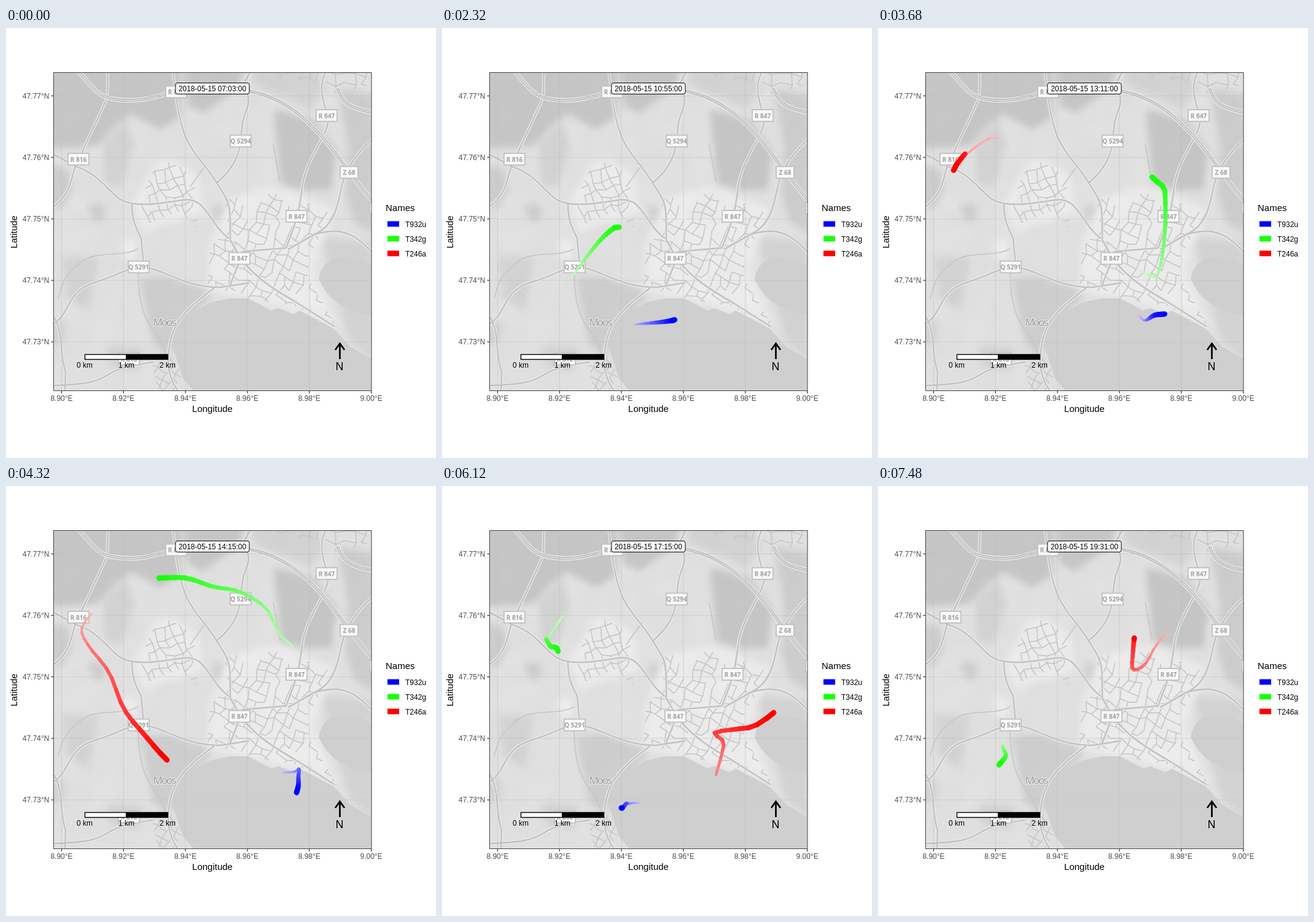
An HTML page that plays this animation: 700x700 px, repeating every 7520 ms.

```html
<!DOCTYPE html>
<html lang="en">
<head>
<meta charset="utf-8">
<title>Movement tracks</title>
<style>
html, body { margin: 0; width: 100%; height: 100%; overflow: hidden; background: #fff; }
svg { display: block; width: 700px; height: 700px; font: 12px "Liberation Sans", Arial, sans-serif; }
.mid { text-anchor: middle; }
.end { text-anchor: end; }
.tick text { fill: #4d4d4d; }
.tick line { stroke: #333; stroke-width: 1.2; }
.title { font-size: 15px; }
.line { fill: none; stroke-linecap: round; stroke-linejoin: round; }
.sign rect { fill: #f8f8f8; stroke: #c0c0c0; stroke-width: 1.8; }
.sign text { font: bold 10px "Open Sans", "Liberation Sans", sans-serif; fill: #a0a0a0; text-anchor: middle; }
.place { font: 17px "Open Sans", "Liberation Sans", sans-serif; letter-spacing: -2px; fill: #989898; stroke: #eee; stroke-width: 2; paint-order: stroke; }
</style>
</head>
<body>
<svg viewBox="0 0 700 700">
  <defs>
    <clipPath id="panel"><rect x="77.5" y="72.5" width="517.5" height="518"/></clipPath>
    <clipPath id="village"><path d="M214 289L244 224L268 218L306 240L312 326L283 298L222 322Z"/></clipPath>
    <clipPath id="town"><path d="M328 420L332 358L362 325L357 284L372 270L396 302L434 262L458 290L494 286L532 304L492 372V408L540 488L468 452L410 444Z"/></clipPath>
    <clipPath id="hamlet"><path d="M235 535L262 525L285 560L288 591H248Z"/></clipPath>
    <clipPath id="north"><path d="M440 73H595V92L540 108L500 86H448Z"/></clipPath>
    <filter id="soft" x="-20%" y="-20%" width="140%" height="140%"><feGaussianBlur stdDeviation="6"/></filter>
    <filter id="relief" x="0" y="0" width="100%" height="100%">
      <feTurbulence type="fractalNoise" baseFrequency=".022" numOctaves="3" seed="8"/>
      <feColorMatrix values="0 0 0 0 .5  0 0 0 0 .5  0 0 0 0 .5  .5 0 0 0 -.17"/>
    </filter>
  </defs>

  <g clip-path="url(#panel)">
    <rect x="77" y="72" width="519" height="519" fill="#e1e1e1"/>
    <g filter="url(#soft)">
      <path fill="#c6c6c6" d="M70 65H285L284 145L250 165L205 140L176 160L150 192L70 196ZM290 65H388L380 96L322 138L296 128ZM436 132L500 150L538 200L530 264L484 264L448 254Z"/>
      <path fill="#cdcdcd" d="M540 98L600 110V335L566 316L552 270L558 200ZM70 222L100 230L108 262L92 292H70ZM132 290L156 286L164 304L148 320ZM336 290H362V318L340 320Z"/>
      <path fill="#d3d3d3" d="M400 65H500L520 100L495 132L402 92ZM158 190L196 150L208 190L188 262L162 250ZM92 372L150 376L134 462L100 440ZM70 480H98L94 514H70ZM162 516L222 520L215 560L170 552ZM512 340L600 350V545L560 510Z"/>
      <path fill="#cecece" d="M218 408L262 404L340 430L300 475L266 535L240 516Z"/>
      <path fill="#ececec" d="M208 285L240 222L270 214L312 240L322 300L225 332ZM326 430L330 352L362 276L438 258L538 296L500 390L538 486L470 462L392 440ZM190 345H212V378H190Z"/>
    </g>
    <rect x="77" y="72" width="519" height="519" filter="url(#relief)" opacity=".28"/>
    <g fill="#cfcfcf">
      <path d="M306 592L288 570L270 515L283 485L304 463L332 447L364 440H394L432 460L443 456L468 466L478 460L533 489L562 520L600 542V592Z"/>
      <path d="M509 408Q515 374 551 373L568 380L580 376L600 392V468Q530 460 509 408Z"/>
    </g>

    <g class="line" stroke="#c6c6c6" stroke-width="1.6">
      <path id="villageStreets" clip-path="url(#village)"/>
      <path id="townStreets" clip-path="url(#town)"/>
      <path id="hamletStreets" clip-path="url(#hamlet)"/>
      <path id="northStreets" clip-path="url(#north)"/>
      <path d="M214 360C185 375 146 360 120 383S93 410 85 440M215 398C216 440 222 468 238 490S256 518 263 540M300 258L326 222M435 190L446 250"/>
    </g>
    <g id="roads" class="line"></g>
    <g id="grid" stroke="#bebebe" stroke-opacity=".5"></g>
    <g id="signs" class="sign"></g>
    <text class="place mid" x="257.5" y="485">Moos</text>
    <g id="trails" class="line"></g>
  </g>

  <rect x="77.5" y="72.5" width="517.5" height="518" fill="none" stroke="#444"/>
  <g id="ticks" class="tick"></g>
  <text class="title mid" x="336" y="625">Longitude</text>
  <text class="title mid" transform="translate(18 332) rotate(-90)">Latitude</text>

  <rect x="128.5" y="531.5" width="135" height="8" fill="#fff" stroke="#000" stroke-width="1.4"/>
  <rect x="195" y="531" width="69" height="9"/>
  <g class="mid"><text x="128" y="553">0 km</text><text x="196" y="553">1 km</text><text x="263" y="553">2 km</text></g>
  <path d="M543.5 539V514M536 524L543.5 513.5L551 524" fill="none" stroke="#000" stroke-width="2.7"/>
  <text class="mid" x="543" y="557" font-size="18">N</text>

  <rect x="276" y="89.5" width="120" height="18" rx="3" fill="#fff" stroke="#000"/>
  <text id="clock" class="mid" x="336" y="103" font-size="11.85"></text>

  <text class="title" x="618" y="298">Names</text>
  <g id="legend"></g>
</svg>

<script>
const FRAME = 40, FRAMES = 188, TAIL = 19;
const el = id => document.getElementById(id);
const fill = (id, list, markup) => el(id).innerHTML = list.map(markup).join("");

// Axes and grid
const xs = Array.from({ length: 6 }, (_, i) => 90.5 + i * 100.82);
const ys = Array.from({ length: 5 }, (_, i) => 110.5 + i * 100.13);
fill("grid", [...xs.map(x => `M${x} 72V591`), ...ys.map(y => `M77 ${y}H595`)], d => `<path d="${d}"/>`);
fill("ticks", [
  ...xs.map((x, i) => `<line x1="${x}" x2="${x}" y1="591" y2="595"/><text class="mid" x="${x}" y="607">${(8.9 + i * .02).toFixed(2)}°E</text>`),
  ...ys.map((y, i) => `<line x1="73.5" x2="77" y1="${y}" y2="${y}"/><text class="end" x="70.5" y="${y + 4.3}">${(47.77 - i * .01).toFixed(2)}°N</text>`)
], s => s);

// Main roads: a pale casing under a grey core
const roads = `M166 73C164 90 168 104 161 122L113 225C106 244 106 270 78 290
  M78 206L113 225C150 238 160 258 182 276S250 286 288 280S330 318 362 342
  M205 287C205 315 212 326 220 342L224 385
  M272 73C276 105 280 145 291 174S326 224 343 252S364 280 365 314V345L382 375L365 418
  M397 73L385 94C405 120 390 128 385 155S388 215 343 252
  M520 73C506 100 520 125 524 148S488 210 482 260S470 320 456 358L385 364
  M78 481C105 465 98 428 145 414S196 388 226 390S290 423 350 422L395 415
  M338 424C300 452 275 475 268 508S262 565 280 591
  M78 470C95 500 86 530 97 560L96 591M78 582C125 580 145 578 165 565S205 549 240 544
  M595 182C570 205 552 232 546 260S535 322 502 336L460 360M502 336C540 325 565 330 595 365
  M382 375C405 405 430 422 470 445L535 486`;
const motorways = `M120 73C140 95 148 110 172 115C230 126 255 102 300 102H390C450 110 490 150 512 174S560 240 595 279
  M540 100C548 120 556 130 595 137`;
fill("roads", [
  [roads, "#ececec", 5], [roads, "#c3c3c3", 2.6],
  [motorways, "#ececec", 7.5], [motorways, "#c0c0c0", 5], [motorways, "#e6e6e6", 1.2]
], ([d, color, width]) => `<path d="${d}" stroke="${color}" stroke-width="${width}"/>`);

// Town streets: a jittered, tilted mesh with missing blocks
function streets(id, cx, cy, size, step, tilt, seed) {
  const rnd = () => (seed = seed * 16807 % 2147483647) / 2147483647;
  const n = Math.ceil(size / step), c = Math.cos(tilt), s = Math.sin(tilt);
  const side = Array.from({ length: 2 * n + 1 }, (_, i) => i - n);
  const nodes = side.map(i => side.map(j => {
    const u = (i + rnd() * .6) * step, v = (j + rnd() * .6) * step * 1.15;
    return [cx + u * c - v * s, cy + u * s + v * c];
  }));
  let d = "";
  nodes.forEach((row, i) => row.forEach((p, j) => {
    if (nodes[i + 1] && rnd() < .72) d += `M${p}L${nodes[i + 1][j]}`;
    if (row[j + 1] && rnd() < .72) d += `M${p}L${row[j + 1]}`;
  }));
  el(id).setAttribute("d", d);
}
streets("villageStreets", 266, 272, 75, 13, -.35, 41);
streets("townStreets", 435, 375, 150, 14, .42, 97);
streets("hamletStreets", 262, 560, 45, 10, .6, 23);
streets("northStreets", 518, 82, 85, 15, .15, 67);

// Road signs: centre and text
fill("signs", [
  [277, 104, "R 847"], [522, 142.5, "R 847"], [382, 184, "Q 5294"], [118, 213.5, "R 816"], [558.5, 235, "Z 68"],
  [473, 306.5, "R 847"], [380, 375, "R 847"], [216, 389, "Q 5291"], [200, 539, "R 816"], [609, 293, "R 816"]
], ([x, y, text]) => {
  const w = text.length < 5 ? 29 : 34;
  return `<rect x="${x - w / 2}" y="${y - 9.5}" width="${w}" height="19"/><text x="${x}" y="${y + 4}">${text}</text>`;
});

// Each run is a smooth curve; a leg spreads its key points evenly from its first to its last step
const tracks = [
  { name: "T932u", rgb: [0, 0, 255], runs: [[
    [0, 36, "312,487 311,489 311,488 309,489 306,484"],
    [57, 76, "376,476 384,470 390,463 405,470 422,467 433,476"],
    [89, 108, "452,467 470,465 477,461 476,473 476,486 473,499"],
    [110, 129, "466,517 428,530 418,523 390,520 374,524 360,517 349,524"],
    [134, 153, "322,516 304,517 300,517 294,524 292,524"]
  ]] },
  { name: "T342g", rgb: [26, 255, 10], runs: [[
    [0, 10, "131,521 150,498"],
    [17, 36, "184,455 176,446 178,437 185,426 190,416 201,416"],
    [57, 76, "281,325 320,336 363,356 390,379 419,392 455,402"],
    [89, 108, "467,265 445,241 423,199 380,172 337,164 294,150 249,150"],
    [110, 129, "236,151 230,144 216,142 205,149 207,165 214,182 217,174"],
    [134, 153, "196,212 172,248 170,250 170,250 177,261 189,269"],
    [168, 187, "203,412 203,425 208,439 197,454"]
  ]] },
  { name: "T246a", rgb: [255, 0, 0], runs: [[
    [62, 76, "402,236 367,227 333,200 304,152 265,130 225,142 203,176 177,181 145,205"],
    [89, 108, "140,207 123,233 135,261 168,304 192,363 228,408 262,446"],
    [110, 129, "295,473 327,495 370,508 404,527 440,533 470,517 476,484 468,485 462,501 447,492"]
  ], [
    [139, 153, "446,470 455,438 458,416 444,402 476,396 508,391 540,369"],
    [158, 164, "553,350 530,290"],
    [168, 187, "476,243 454,258 434,291 415,298 415,271 417,249 417,249"]
  ]] }
];

// Cubic curve through the timed key points, one position per step
function sample(runs) {
  const pos = [];
  for (const legs of runs) {
    const keys = legs.flatMap(([from, to, text]) => text.split(" ").map((p, i, all) =>
      ({ t: from + (to - from) * i / (all.length - 1), p: p.split(",").map(Number) })));
    const slope = (i, axis) => {
      const a = keys[Math.max(i - 1, 0)], b = keys[Math.min(i + 1, keys.length - 1)];
      return (b.p[axis] - a.p[axis]) / (b.t - a.t);
    };
    for (let f = keys[0].t, i = 0; f <= keys[keys.length - 1].t; f++) {
      while (i < keys.length - 2 && keys[i + 1].t < f) i++;
      const a = keys[i], b = keys[i + 1], h = b.t - a.t, u = (f - a.t) / h, v = 1 - u;
      pos[f] = [0, 1].map(k =>
        a.p[k] * (1 + 2 * u) * v * v + b.p[k] * (3 - 2 * u) * u * u +
        h * u * v * (slope(i, k) * v - slope(i + 1, k) * u));
    }
  }
  return pos;
}
tracks.forEach(t => t.pos = sample(t.runs));

fill("legend", tracks, (t, i) =>
  `<rect x="621" y="${314.5 + i * 24}" width="19" height="9" fill="rgb(${t.rgb})"/><text x="650" y="${324 + i * 24}">${t.name}</text>`);

// The tail thins out and pales with age
function trail({ pos, rgb }, now) {
  let out = "";
  for (let f = Math.max(1, now - TAIL + 1); f <= now; f++) {
    const a = pos[f - 1], b = pos[f];
    if (!a || !b) continue;
    const k = 1 - (now - f) / TAIL;
    const color = rgb.map(c => Math.round(255 + (c - 255) * (.25 + .75 * k)));
    out += `<path d="M${a}L${b}" stroke="rgb(${color})" stroke-width="${2.6 + 6.2 * k}"/>`;
  }
  return out;
}

const two = n => String(n).padStart(2, "0");
let shown = -1;
function draw(time) {
  const now = Math.floor(time / FRAME) % FRAMES;
  if (now === shown) return;
  shown = now;
  const min = 7 * 60 + 3 + now * 4;
  el("clock").textContent = `2018-05-15 ${two(Math.floor(min / 60))}:${two(min % 60)}:00`;
  fill("trails", tracks, t => trail(t, now));
}
const start = performance.now();
function loop() {
  draw(performance.now() - start);
  requestAnimationFrame(loop);
}
loop();
</script>
</body>
</html>
```
